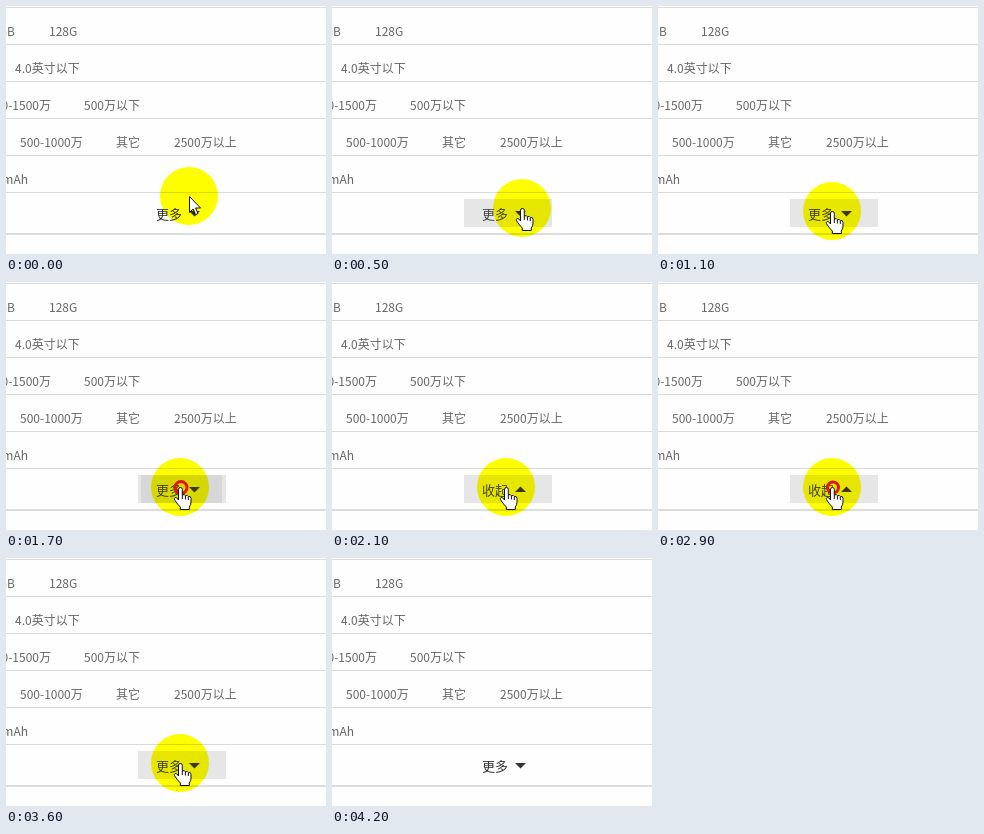
Animation of 320 by 248 pixels, one loop 5.1 s. Source, as an HTML page:

```html
<!DOCTYPE html>
<html lang="zh">
<head>
<meta charset="utf-8">
<title>Filter panel toggle</title>
<style>
html, body { margin: 0; width: 100%; height: 100%; overflow: hidden; background: #fefefe; }
svg { display: block; width: 320px; height: 248px; }
text { font: 12px "Noto Sans CJK SC", "Noto Sans CJK", "Noto Sans", sans-serif; fill: #666; }
#label { font-size: 13px; }
#spot { mix-blend-mode: multiply; }
</style>
</head>
<body>
<svg id="stage" viewBox="0 0 320 248">
  <rect width="320" height="248" fill="#fefefe"/>
  <g id="rows"></g>
  <rect y="227" width="320" height="2" fill="#d9dddd"/>
  <rect id="button" x="132" y="193" width="88" height="28" fill="#e6e6e6"/>
  <rect id="press" x="135" y="193" width="81" height="28" fill="#d7d7d7"/>
  <text id="label" x="150" y="213"></text>
  <path id="caret"/>
  <circle id="spot" r="29" fill="#ff0"/>
  <circle id="ring" fill="none" stroke="#e3120b" stroke-width="3"/>
  <g id="cursor" stroke="#111" stroke-width="1" stroke-linejoin="round" fill="#fff">
    <path id="arrow" d="M.5 .5V16.5L4.2 13 6.6 18.7 9 17.6 6.6 12H11.5Z"/>
    <path id="hand" d="M-1.5 13V2.2Q-1.5 .5 .4 .5T2.3 2.2V8Q4.8 6.8 5.4 8.8 7.7 7.6 8.3 9.6 11 8.8 11 11.5V15Q11 18 9.3 20V22.5H.3V20Q-2.5 17.4-5.4 12.8-6.2 11.2-4.8 10.5-3.3 10-1.5 13ZM2.3 8V12M5.4 9V12.5M8.3 10V13"/>
  </g>
</svg>
<script>
const LOOP = 5100, STEP = 100;
const NS = "http://www.w3.org/2000/svg";
const $ = id => document.getElementById(id);

function add(tag, attrs, text = "") {
  const el = document.createElementNS(NS, tag);
  for (const k in attrs) el.setAttribute(k, attrs[k]);
  el.textContent = text;
  $("rows").append(el);
}

// Each row: text cut by the left edge with its right end, then [x, text] items
const rows = [
  ["GB", 9, [43, "128G"]],
  ["", 0, [9, "4.0英寸以下"]],
  ["1000-1500万", 45, [78, "500万以下"]],
  ["", 0, [14, "500-1000万"], [110, "其它"], [168, "2500万以上"]],
  ["mAh", 22]
];
rows.forEach(([cut, end, ...items], i) => {
  const y = 30 + 37 * i;
  add("text", { x: end, y, "text-anchor": "end" }, cut);
  for (const [x, s] of items) add("text", { x, y }, s);
});
for (let i = 0; i < 6; i++)
  add("rect", { y: 1 + 37 * i, width: 320, height: 1, fill: "#dadada" });

// Pointer path: time, x, y
const path = [
  [0, 183, 190], [200, 183, 190], [500, 190, 202], [600, 189, 208],
  [700, 184, 211], [800, 179, 210], [1100, 174, 205], [3800, 174, 205],
  [3900, 182, 214], [4000, 198, 232], [4100, 213, 252], [4200, 240, 290]
];
const clicks = [1600, 2900];

function pointer(t) {
  const i = path.findIndex(p => p[0] > t);
  if (i < 0) return path[path.length - 1].slice(1);
  const [t0, x0, y0] = path[i - 1], [t1, x1, y1] = path[i];
  const k = (t - t0) / (t1 - t0);
  return [x0 + (x1 - x0) * k, y0 + (y1 - y0) * k];
}

const show = (id, on) => $(id).style.display = on ? "" : "none";
const set = (id, k, v) => $(id).setAttribute(k, v);

function draw(now) {
  const t = Math.floor(now % LOOP / STEP) * STEP;
  const [x, y] = pointer(t);
  const hover = x >= 132 && x < 220 && y >= 193 && y < 221;
  const open = t >= 1800 && t < 3000;
  const at = `translate(${x} ${y})`;

  show("button", hover);
  show("press", t === 1700);
  show("spot", t < 4200);
  show("cursor", t < 4200);
  show("arrow", !hover);
  show("hand", hover);
  set("spot", "transform", at);
  set("cursor", "transform", at);

  $("label").textContent = open ? "收起" : "更多";
  $("label").style.fill = hover ? "#444450" : "#333";
  set("caret", "d", open ? "M183 210H194L188.5 204.5Z" : "M183 205H194L188.5 210.5Z");
  set("caret", "fill", hover ? "#3a3a94" : "#333");

  const age = t - clicks.findLast(c => c <= t);
  show("ring", age >= 0 && age < 500);
  set("ring", "transform", `translate(${x + 1} ${y + .5})`);
  set("ring", "r", 5.5 + Math.max(0, age) / 200);
  set("ring", "opacity", age > 200 ? (500 - age) / 300 : 1);
}

function tick() {
  draw(performance.now());
  requestAnimationFrame(tick);
}
tick();
</script>
</body>
</html>
```
